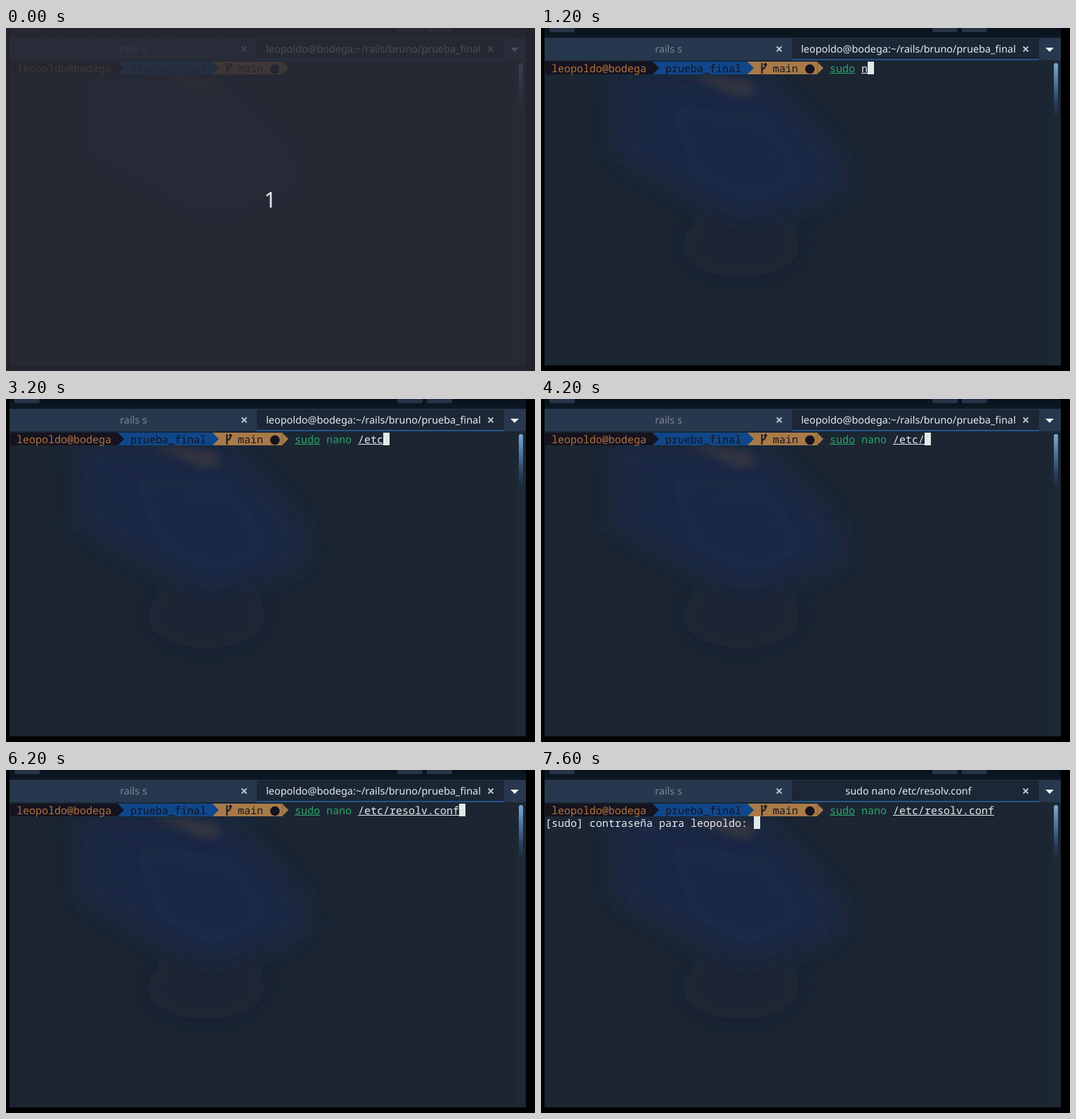
Recreate the animation shown at these times as an HTML page. Size 753 by 489 pixels, loop 8 s.

```html
<!DOCTYPE html>
<html lang="es">
<head>
<meta charset="utf-8">
<title>Terminal</title>
<style>
html, body { margin: 0; width: 100%; height: 100%; overflow: hidden; background: #000; }
svg { display: block; width: 753px; height: 489px; }
text { text-rendering: geometricPrecision; }
.mono { font: 15px "Noto Sans Mono", monospace; }
.ui { font: 14.4px "Noto Sans", sans-serif; text-anchor: middle; }
</style>
</head>
<body>
<svg viewBox="0 0 753 489" xmlns="http://www.w3.org/2000/svg">
  <defs>
    <linearGradient id="thumb" x2="0" y2="1">
      <stop offset="0" stop-color="#78abd8"/>
      <stop offset=".4" stop-color="#486c98"/>
      <stop offset=".7" stop-color="#2a3d5b"/>
      <stop offset="1" stop-color="#1b2632"/>
    </linearGradient>
    <linearGradient id="strip" x2="0" y2="1">
      <stop offset="0" stop-color="#08121c"/>
      <stop offset="1" stop-color="#0c1924"/>
    </linearGradient>
    <filter id="soft" x="-50%" y="-50%" width="200%" height="200%"><feGaussianBlur stdDeviation="18"/></filter>
    <filter id="glow" x="-50%" y="-100%" width="200%" height="300%"><feGaussianBlur stdDeviation="6"/></filter>
    <clipPath id="pane"><rect x="5" y="46" width="720" height="435"/></clipPath>
  </defs>

  <rect width="753" height="489" fill="#000"/>
  <rect x="5" width="735" height="14" fill="url(#strip)"/>
  <g fill="#273448">
    <rect x="12" y="-8" width="36" height="14" rx="3"/>
    <rect x="557" y="-8" width="36" height="14" rx="3"/>
    <rect x="599" y="-8" width="36" height="14" rx="3"/>
  </g>

  <!-- tab bar -->
  <rect x="5" y="14" width="735" height="32" fill="#27374d"/>
  <rect x="357" y="15" width="352" height="31" fill="#1b2734"/>
  <rect x="357" y="44" width="352" height="2" fill="#27548f"/>
  <text class="ui" x="181.500" y="35" fill="#7d8794">rails s</text>
  <text class="ui" id="title" x="523" y="35" fill="#e6ebf0"></text>
  <path d="M335.500 26.500l7 7m0-7l-7 7M686.500 26.500l7 7m0-7l-7 7" stroke="#bcc5cf" stroke-width="1.900"/>
  <path d="M718 28h12l-6 6z" fill="#f0f3f6"/>

  <!-- wallpaper -->
  <rect x="5" y="46" width="735" height="435" fill="#1b2632"/>
  <g clip-path="url(#pane)">
    <g filter="url(#soft)" fill="#1b2a4b">
      <path d="M100 60H310L420 170 430 235 350 262 280 275 200 235 105 185Z" opacity=".75"/>
      <path d="M180 110L320 120 380 210 300 260 220 220Z" opacity=".35"/>
      <ellipse cx="285" cy="310" rx="85" ry="45" fill="#20253a" opacity=".25"/>
    </g>
    <g fill="none" stroke="#29446c" opacity=".17">
      <path d="M225 105Q330 95 395 185T435 245"/>
      <path d="M250 140Q320 130 370 190T365 235"/>
      <path d="M120 120Q145 190 205 205T310 240"/>
      <path d="M330 180q20-16 38 8t-10 24"/>
    </g>
    <path d="M200 66Q250 66 300 76L304 95Q285 102 265 92Q230 74 200 66Z" fill="#49423f" opacity=".5" filter="url(#glow)"/>
  </g>
  <rect x="725" y="46" width="15" height="435" fill="#1c2834"/>
  <rect x="730" y="50" width="6" height="80" rx="3" fill="url(#thumb)"/>

  <!-- prompt -->
  <path d="M294 48H393L402 57 393 66H294Z" fill="#a87a48"/>
  <path d="M393.500 48V66" stroke="#80603f"/>
  <path d="M159 48H294L303 57 294 66H159Z" fill="#10478a"/>
  <path d="M6 48H159L168 57 159 66H6Z" fill="#15131f"/>
  <g class="mono" fill="#15131f">
    <text x="15" y="63" fill="#b17440">leopoldo@bodega</text>
    <text x="177" y="63">prueba_final</text>
    <text x="330" y="63">main</text>
  </g>
  <path d="M314.500 50V65M319.500 51V54Q319.500 57 314.500 59" fill="none" stroke="#15131f" stroke-width="2"/>
  <path d="M316.500 53l3-4 3 4z" fill="#15131f"/>
  <circle cx="382.800" cy="58.500" r="6.800" fill="#15131f"/>

  <g id="words"></g>
  <text class="mono" id="ask" x="6" y="81" fill="#e6edf0">[sudo] contraseña para leopoldo:</text>
  <rect id="cursor" width="9" height="18" fill="#e1eae7"/>

  <g id="countdown">
    <rect width="753" height="489" fill="#292b34" opacity=".83"/>
    <text x="376" y="255.500" fill="#e4e6e9" text-anchor="middle" style="font:31px 'Noto Sans',sans-serif">1</text>
  </g>
</svg>
<script>
const LOOP = 8000, CELL = 9, LEFT = 411, ROW = 48;
const COMMAND = 'sudo nano /etc/resolv.conf';
const HOME_TITLE = 'leopoldo@bodega:~/rails/bruno/prueba_final';
const GREEN = '#2ba56b', WHITE = '#e6edf0', RED = '#c5504b';

// [time, characters typed]; the first nine keys come at an even pace
const KEYS = [[1600, 10], [2400, 11], [2700, 12], [3000, 13], [3200, 14], [4200, 15],
  [4400, 17], [4600, 18], [4700, 19], [4900, 20], [5100, 21], [5500, 22],
  [5900, 24], [6000, 25], [6200, 26]];

const el = id => document.getElementById(id);
const words = el('words'), ask = el('ask'), cursor = el('cursor');
const title = el('title'), countdown = el('countdown');
const show = (node, on) => node.setAttribute('visibility', on ? 'visible' : 'hidden');

function typedCount(t) {
  let count = Math.max(0, Math.min(9, Math.floor((t - 600) / 100)));
  for (const [at, n] of KEYS) if (t >= at) count = n;
  return count;
}

// Shell highlighting: commands green, path prefixes underlined, the rest red
function styleOf(word) {
  if (word === 'sudo') return [GREEN, true];
  if (word === 'su' || word === 'nano') return [GREEN, false];
  if (word[0] === '/' || word.length === 1) return [WHITE, true];
  return [RED, false];
}

function wordMarkup(word, col) {
  const [fill, underline] = styleOf(word);
  const x = LEFT + col * CELL;
  const line = underline
    ? `<rect x="${x}" y="64" width="${word.length * CELL}" height="1" fill="${fill}"/>` : '';
  return `<text class="mono" x="${x}" y="63" fill="${fill}">${word}</text>${line}`;
}

let drawn = -1;
function drawCommand(count) {
  if (count === drawn) return;
  drawn = count;
  let markup = '';
  for (const m of COMMAND.slice(0, count).matchAll(/\S+/g)) markup += wordMarkup(m[0], m.index);
  words.innerHTML = markup;
}

function render(t) {
  const count = typedCount(t);
  const entered = t >= 6700, asking = t >= 6800;
  drawCommand(count);
  show(countdown, t < 100);
  show(ask, asking);
  show(cursor, t >= 300 && !(t >= 7300 && t < 7600));
  cursor.setAttribute('x', asking ? 303 : entered ? 6 : LEFT + count * CELL);
  cursor.setAttribute('y', entered ? ROW + 18 : ROW);
  title.textContent = entered ? COMMAND : HOME_TITLE;
}

const start = performance.now();
function tick() {
  render((performance.now() - start) % LOOP);
  requestAnimationFrame(tick);
}
tick();
</script>
</body>
</html>
```
